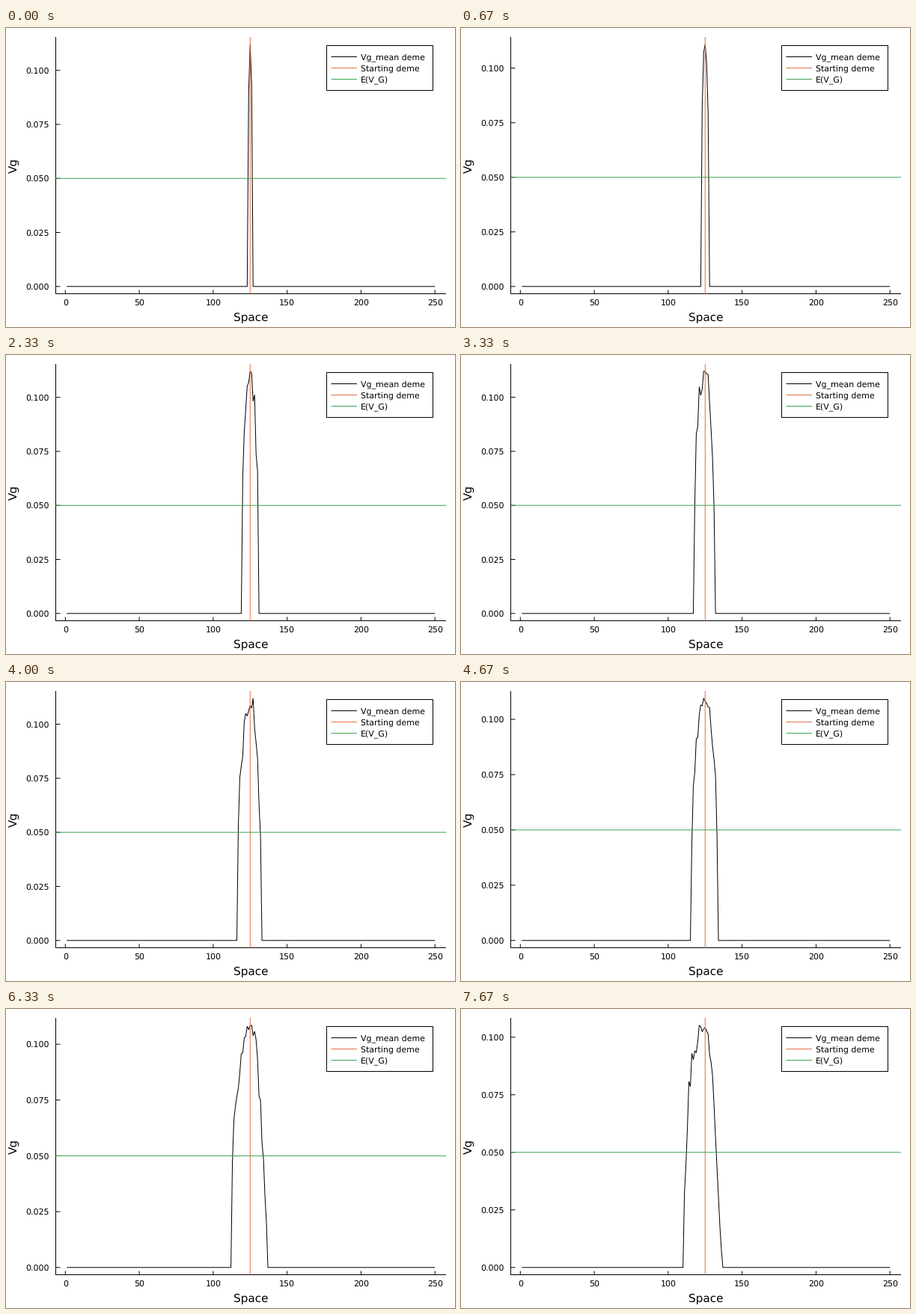
A matplotlib script that plays this animation: 600x400 px, repeating every 8000 ms.

```python
import numpy as np
import matplotlib.pyplot as plt
from matplotlib.animation import FuncAnimation
from matplotlib.patches import Rectangle

W, H, DPI = 600, 400, 100
LOOP_MS, TICK_MS, STEPS = 8000, 40, 24
LEFT, RIGHT, TOP, BOTTOM = 66.5, 588, 12, 355.5
PAD = 0.03
ORANGE, GREEN = "#e26f46", "#3da44d"
THIN = 72 / DPI
SMALL, LARGE = 11, 15.2
CENTRE = 125

demes = np.arange(1, 251)


def variance(step):
    """Noisy dome that spreads from the centre and gets a steeper right flank."""
    first = round(124 - 0.565 * step)
    last = min(round(126 + 0.53 * step), 136)
    peak = np.interp(step, [0, 4, 7, 12, 16, 19, 23],
                     [0.1121, 0.1098, 0.1121, 0.112, 0.1071, 0.1085, 0.1052])
    offset = demes - CENTRE
    reach = np.where(offset < 0, CENTRE + 1 - first, last + 1 - CENTRE)
    u = np.clip(np.abs(offset) / reach, 0, 1)
    steepness = np.where(offset < 0, 0.5, 0.5 + max(0, step - 16) / 7)
    noise = np.random.default_rng(step).normal(0, 0.1, demes.size)
    dome = (1 - u**2) ** steepness * (1 + noise * u)
    return peak * dome / dome.max()


def px(deme):
    low, high = 1 - PAD * 249, 250 + PAD * 249
    return LEFT + (np.asarray(deme) - low) / (high - low) * (RIGHT - LEFT)


def py(value, peak):
    unit = (BOTTOM - TOP) / (1 + 2 * PAD)
    return BOTTOM - unit * (PAD + np.asarray(value) / peak)


plt.rcParams.update({"font.family": "DejaVu Sans", "text.hinting": "none"})
fig = plt.figure(figsize=(W / DPI, H / DPI), dpi=DPI, facecolor="white")
ax = fig.add_axes([0, 0, 1, 1])
ax.set(xlim=(0, W), ylim=(H, 0))
ax.axis("off")


def line(xs, ys, color="black", z=2):
    return ax.plot(xs, ys, color=color, lw=THIN, zorder=z, snap=False,
                   solid_capstyle="butt", solid_joinstyle="miter")[0]


def baseline(y, size):
    """Baseline that centres the digits on y."""
    return y + 0.365 * size


def label(x, y, text, size=SMALL, ha="left"):
    return ax.text(x, baseline(y, size), text, fontsize=size * 72 / DPI,
                   ha=ha, va="baseline", zorder=6)


line([LEFT, LEFT], [TOP, BOTTOM + 0.5])
line([LEFT, RIGHT], [BOTTOM, BOTTOM])
for deme in range(0, 251, 50):
    line([px(deme)] * 2, [BOTTOM, BOTTOM - 5])
    label(px(deme), 367, str(deme), ha="center")

tick_values = np.arange(5) * 0.025
ticks = [(line([LEFT, LEFT + 6], [0, 0]), label(58, 0, f"{v:.3f}", ha="right"))
         for v in tick_values]

label(327, 386.5, "Space", LARGE, "center")
ax.text(11.5, 183.5, "Vg", fontsize=LARGE * 72 / DPI, rotation=90,
        ha="center", va="center")

curve = line([], [], z=3)
line([px(CENTRE)] * 2, [TOP, BOTTOM], ORANGE, 3.1)
expected = line([LEFT, RIGHT], [0, 0], GREEN, 3.2)

ax.add_patch(Rectangle((428.5, 23.5), 142, 60, fc="white", ec="black",
                       lw=THIN, zorder=4, snap=False))
legend = [("black", "Vg_mean deme"), (ORANGE, "Starting deme"), (GREEN, "E(V_G)")]
for row, (color, text) in enumerate(legend):
    y = 38.5 + 15 * row
    line([434.5, 469], [y, y], color, 5)
    label(474.3, y, text)


def update(tick):
    step = ((tick + 1) * TICK_MS - 1) * STEPS // LOOP_MS
    values = variance(step)
    peak = values.max()
    curve.set_data(px(demes), py(values, peak))
    expected.set_ydata([py(0.05, peak)] * 2)
    for value, (mark, text) in zip(tick_values, ticks):
        y = py(value, peak)
        mark.set_ydata([y, y])
        text.set_y(baseline(y, SMALL))
    return []


anim = FuncAnimation(fig, update, frames=LOOP_MS // TICK_MS, interval=TICK_MS,
                     repeat=True, repeat_delay=0, blit=False)
plt.show()
```
